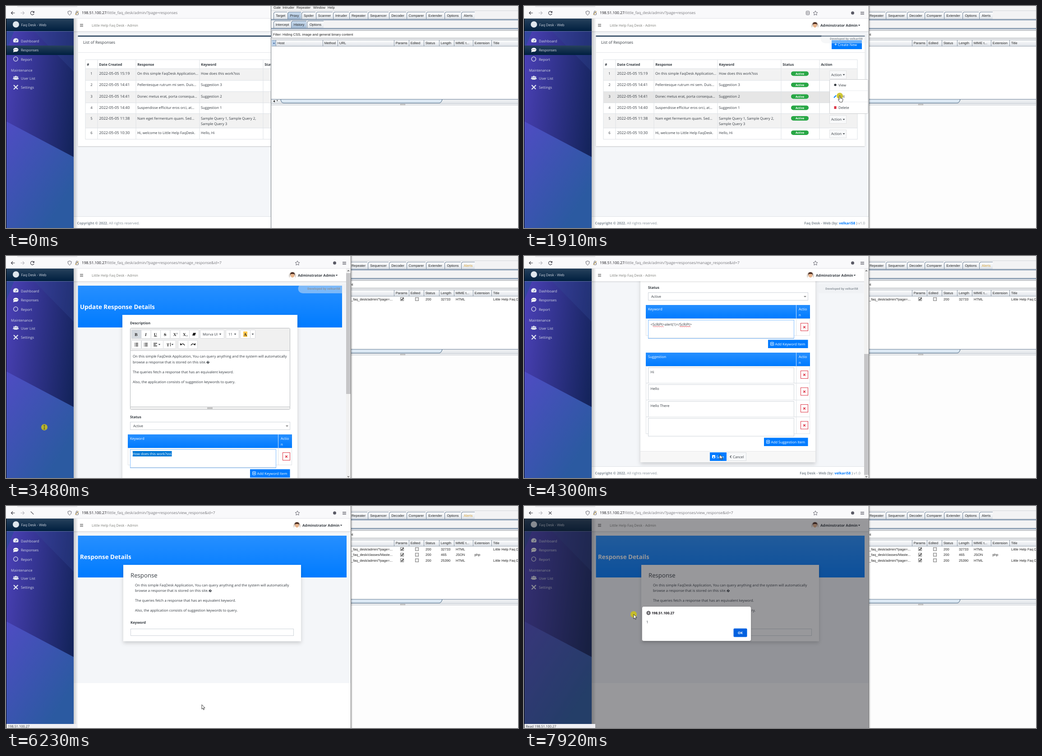
An HTML page that plays this animation: 1135 by 494 pixels, repeating every 7990 ms.

```html
<!DOCTYPE html>
<html lang="en">
<head>
<meta charset="utf-8">
<title>Admin panel recording</title>
<style>
html, body { margin: 0; width: 100%; height: 100%; overflow: hidden; background: #fff; }
svg { display: block; width: 1135px; height: 494px; }
text { font: 7.85px 'Open Sans', 'Noto Sans', sans-serif; fill: #343a40; text-rendering: geometricPrecision; white-space: pre; }
.b { font-weight: 700; }
.w { fill: #fff; }
.m { text-anchor: middle; }
.e { text-anchor: end; }
.side text { fill: #d3d8e4; }
.tool text { font: 7.6px 'Liberation Sans', Arial, sans-serif; fill: #222; }
.serif text { font: bold 9.5px 'Liberation Serif', serif; fill: #222; text-anchor: middle; }
.url { font-size: 8.42px; fill: #77777c; }
.title { font-size: 13.4px; font-weight: 700; fill: #fff; }
.foot { fill: #869099; }
.tag { font-size: 6.3px; font-weight: 700; fill: #8b939b; }
</style>
</head>
<body>
<svg id="stage" viewBox="0 0 1135 494"></svg>
<script>
const LOOP = 7990;
const HOST = '198.51.100.27', APP = 'little_faq_desk', BRAND = 'Faq Desk - Web', AUTHOR = 'velkari58';
const SITE = 'Little Help Faq Desk';

const T = (x, y, s, c = '', o = '') => `<text x="${x}" y="${y}" class="${c}" ${o}>${s}</text>`;
const R = (x, y, w, h, fill, o = '') => `<rect x="${x}" y="${y}" width="${w}" height="${h}" fill="${fill}" ${o}/>`;
const box = (x, y, w, h, fill, line, r = 0) => R(x + .5, y + .5, w - 1, h - 1, fill, `stroke="${line}" rx="${r}"`);
const P = (d, line, w = 1, o = '') => `<path d="${d}" fill="none" stroke="${line}" stroke-width="${w}" ${o}/>`;
const F = (d, fill) => `<path d="${d}" fill="${fill}"/>`;
const C = (x, y, r, fill, o = '') => `<circle cx="${x}" cy="${y}" r="${r}" fill="${fill}" ${o}/>`;
const G = (id, s, o = '') => `<g ${id && `id="${id}"`} ${o}>${s}</g>`;
const hline = (x1, x2, y, c) => R(x1, y, x2 - x1, 1, c);
const vline = (x, y1, y2, c) => R(x, y1, 1, y2 - y1, c);
const caret = (x, y, c = '#343a40') => F(`M${x - 2.3} ${y - 1.2}h4.6l-2.3 2.6z`, c);
const chevron = (x, y, up = 1) => P(`M${x - 2} ${y + up}l2 ${-2 * up}l2 ${2 * up}`, '#555', 1.1);
const grad = (id, a, b, dir = 'x2="0" y2="1"') =>
  `<linearGradient id="${id}" ${dir}><stop stop-color="${a}"/><stop offset="1" stop-color="${b}"/></linearGradient>`;
const shadow = (id, dy, blur, alpha) => `<filter id="${id}" x="-10%" y="-10%" width="120%" height="125%">
<feDropShadow dx="0" dy="${dy}" stdDeviation="${blur}" flood-opacity="${alpha}"/></filter>`;

const defs = `<defs>
${grad('navy', '#26415c', '#001f3f')}${grad('blue', '#268fff', '#007bff')}
${grad('tab', '#ffffff', '#dde2e8')}${grad('tabOn', '#c9dbee', '#a4bcd6')}
${grad('night', '#483fb2', '#14245c', 'x1="0" y1=".3" x2=".95" y2=".65"')}
${grad('dusk', '#4f4cc3', '#2b5aa1', 'x1="0" y1="0" x2=".8" y2=".8"')}
${grad('shade', 'rgba(0,0,0,.22)', 'rgba(0,0,0,0)')}
${grad('edge', 'rgba(0,0,0,.2)', 'rgba(0,0,0,0)', 'x2="1" y2="0"')}
${shadow('soft', .6, 1, .28)}${shadow('lift', 4, 4, .17)}
<clipPath id="toolClip"><rect id="toolRect" y="0" width="600" height="494"/></clipPath>
<clipPath id="selClip"><rect id="selRect" y="280" height="30"/></clipPath>
</defs>`;

function listPage() {
  const cols = [176, 203, 288, 429, 570, 655, 739];
  const tops = [119, 139, 165, 190, 215, 239, 271, 296];
  const data = [
    ['15:19', 'On this simple FaqDesk Application...', 'How does this work?sss'],
    ['14:41', 'Pellentesque rutrum mi sem. Duis...', 'Suggestion 3'],
    ['14:41', 'Donec metus erat, porta consequa...', 'Suggestion 2'],
    ['14:40', 'Suspendisse efficitur eros orci, at...', 'Suggestion 1'],
    ['11:38', 'Nam eget fermentum quam. Sed...', 'Sample Query 1, Sample Query 2,'],
    ['10:30', 'Hi, welcome to Little Help FaqDesk.', 'Hello, Hi']];
  let s = R(159.5, 66, 596, 246, '#fff', 'filter="url(#soft)"') + R(159.5, 66, 596, 2, '#001f3f') +
    T(171, 84, 'List of Responses', '', 'style="font-size:8.8px"') + hline(160, 756, 103, '#e3e5e8') +
    R(682, 76, 67, 20, '#007bff') + T(688, 89, '<tspan class="b" font-size="10">+</tspan> Create New', 'w');
  [0, 2, 4].forEach(i => s += R(176, tops[i + 1], 563, tops[i + 2] - tops[i + 1], '#f2f2f2'));
  s += R(176, 0, 563, 0, 'rgba(0,0,0,.05)', 'id="hover"');
  tops.forEach(y => s += hline(176, 739, y, '#dee2e6'));
  cols.forEach(x => s += vline(x - .5, 119, 297, '#dee2e6'));
  ['#', 'Date Created', 'Response', 'Keyword', 'Status', 'Action'].forEach((h, i) => s += T(cols[i] + 3.2, 132.5, h, 'b'));
  data.forEach(([time, text, key], i) => {
    const y = tops[i + 1] + 14 - (i > 3 ? .5 : 0) - (i == 1 ? 1 : 0);
    s += T(189.5, y, i + 1, 'm') + T(206.5, y, `2022-05-05 ${time}`, '', 'style="font-size:8.45px"') +
      T(291, y, text) + T(432, y, key) + R(592, y - 7.6, 39, 10, '#28a745', 'rx="5"') +
      T(611.5, y - .2, 'Active', 'b w m', 'style="font-size:6.2px"') +
      box(677, y - 9.5, 38, 19, '#f8f9fa', '#e2e3e5') + T(681, y + 2.8, 'Action') + caret(709, y);
  });
  s += T(432, 265, 'Sample Query 3');
  const menu = box(677, 163, 86, 77, '#fff', '#c8cacd', 2) + hline(678, 762, 188, '#e9ecef') + hline(678, 762, 213, '#e9ecef') +
    C(690, 175.5, 2.6, '#343a40') + T(697, 178.5, 'View') +
    P('M687 204l5-5', '#007bff', 2) + T(697, 203.5, 'Edit') + R(687.5, 223, 5, 6, '#dc3545') + T(697, 229, 'Delete');
  return s + G('menu', menu) + footer(756, 468);
}

function footer(right, y) {
  return R(150, y, 615, 30, '#fff') + hline(150, 765, y, '#dee2e6') +
    T(157.5, y + 17.5, '<tspan class="b">Copyright © 2022.</tspan> All rights reserved.', 'foot') +
    T(right, y + 17.5, `<tspan class="b">${BRAND} (by: <tspan fill="#007bff">${AUTHOR}</tspan> )</tspan> v1.0`, 'foot e');
}

const APP_LINE = 'On this simple FaqDesk Application, You can query anything and the system will';
const paragraphs = (x, y) => T(x, y, APP_LINE + ' automatically') +
  T(x, y + 12.5, 'browse a response that is stored on this site.\uFFFD') +
  T(x, y + 34.5, 'The queries fetch a response that has an equivalent keyword.') +
  T(x, y + 56.5, 'Also, the application consists of suggestion keywords to query.');

function editor() {
  const btn = (x, w, y, fill = '#fff') => box(x, y, w, 20, fill, '#d6d8db', 1);
  let s = box(275, 160, 355, 182, '#fff', '#b5b8bb', 2) + R(276, 161, 353, 49, '#f0f0f0') + hline(275, 630, 210, '#c4c6c9');
  let glyphs = '';
  ['B', 'I', 'U', 'S', 'X', 'X'].forEach((c, i) => {
    s += btn(278 + i * 21.4, 22.4, 164, i ? '#fff' : '#d5dadf');
    const deco = ['', 'font-style:italic', 'text-decoration:underline', 'text-decoration:line-through'][i] || '';
    glyphs += T(288.5 + i * 21.4, 177.5, c, '', `style="${deco}"`);
  });
  s += btn(406, 22, 164) + G('', glyphs, 'class="serif"') + T(378, 174, '2', 'b', 'style="font-size:4px"') +
    T(400, 179, '2', 'b', 'style="font-size:4px"') + F('M415 171h6l-2 6h-6z', '#222') +
    btn(430, 54, 164) + T(436, 177, 'Morva UI') + caret(475, 174) + btn(487, 30, 164) + T(493, 177, '11') + caret(508, 174) +
    btn(519, 23, 164) + R(526, 168, 9, 12, '#ffc94d') + G('', T(530.5, 177.5, 'A'), 'class="serif"') + btn(541, 12, 164) + caret(547, 174);
  [[278, 22], [300, 22], [321, 28], [348, 29], [381, 23], [403, 22]].forEach(([x, w]) => s += btn(x, w, 187));
  [0, 3, 6].forEach((d, i) => {
    s += R(287, 193.5 + d, 6, 1.4, '#222') + R(284.5, 193.5 + d, 1.2, 1.4, '#222') + R(308, 193.5 + d, 6, 1.4, '#222') +
      C(306.3, 194.2 + d, .8, '#222') + R(327, 193.5 + d, i == 1 ? 5 : 8, 1.4, '#222');
  });
  s += caret(340, 197) + G('', T(359, 200.5, 'T'), 'class="serif"') + P('M364.5 193v8', '#222') + caret(369, 197) +
    P('M388 197q5-4 8 2', '#222', 1.4) + F('M386 198.5v-5l4.5 4.5z', '#222') +
    P('M410 199q3-6 8-2', '#222', 1.4) + F('M420 198.5v-5l-4.5 4.5z', '#222');
  return s + paragraphs(281, 226) + R(276, 335, 353, 6, '#f0f0f0') + hline(275, 630, 335, '#c4c6c9') +
    hline(446, 458, 337, '#999') + hline(446, 458, 339, '#999');
}

const rawArea = () => box(275, 160, 355, 41, '#fff', '#ced4da') + T(280, 172.7, '&lt;p>' + APP_LINE) +
  T(280, 185, 'automatically browse a response that is stored on this site.\uFFFD&lt;/p>&lt;p>The queries fetch a') +
  T(280, 197.4, 'response that has an equivalent keyword.&lt;/p>&lt;p>Also, the application consists of') +
  R(619, 161, 10, 39, '#f3f3f3') + chevron(623.5, 166) + chevron(623.5, 185, -1) + P('M620 199l7-7M624 199l3-3', '#57a');

function formTable(y, name, rows) {
  let s = R(270, y, 364, 30, 'url(#blue)') + vline(603, y, y + 31, '#cfe4fb') +
    T(275, y + 12, name, 'w') + T(609, y + 12, 'Actio', 'w') + T(609, y + 24.5, 'n', 'w');
  rows.forEach((label, i) => {
    const top = y + 30 + i * 37.5;
    s += box(270, top, 364, 38.5, '#fff', '#dee2e6') + vline(603, top, top + 38, '#dee2e6') +
      box(275, top + 3, 324, 41, '#fff', '#ced4da') + T(280.5, top + 15.7, label) +
      box(613, top + 10, 17, 18, '#fff', '#dc3545') + P(`M619.2 ${top + 17}l4.6 4.6m0-4.6l-4.6 4.6`, '#dc3545', 1.5);
  });
  return s;
}

const addButton = (x, y, label) => R(x, y, 629.5 - x, 18.5, '#007bff') +
  box(x + 5, y + 5, 8, 8, 'none', '#fff', 1) + P(`M${x + 7} ${y + 9}h4m-2-2v4`, '#fff') + T(x + 15.5, y + 12, label, 'w');

const wave = x => P(`M${x} 304` + 'q1-1.6 2 0t2 0'.repeat(6), '#e0202f', .8);

function editPage() {
  const script = 'ScRiPt>';
  const lower = T(275, 220, 'Status', 'b') + box(275, 228, 355, 18, '#fff', '#ced4da') + T(282, 240, 'Active') + chevron(623, 237, -1) +
    formTable(256, 'Keyword', ['']) +
    G('focus', box(275, 289, 324, 42, 'none', '#80bdff')) +
    G('before', T(280.5, 302, 'How does this work?sss') +
      G('', R(280.5, 293, 87, 12, '#0078d7') + T(280.5, 302, 'How does this work?sss', 'w'), 'clip-path="url(#selClip)"')) +
    G('after', T(280.5, 302, `&lt;${script}alert(1)&lt;/${script}`) + wave(285.5) + wave(345)) +
    addButton(541, 333.5, 'Add Keyword Item') +
    formTable(362, 'Suggestion', ['Hi', 'Hello', 'Hello There', '']) + addButton(532, 551.5, 'Add Suggestion Item') +
    R(258, 581, 388, 25, '#f7f7f7') + hline(258, 646, 581, '#e6e7e8') + R(412, 584, 37, 19, '#007bff') +
    R(417, 590, 7, 7, '#fff', 'rx="1"') + R(419, 593.5, 3, 2.5, '#007bff') + T(426.5, 597, 'Save', 'w') +
    box(451, 584, 42, 19, '#f8f9fa', '#dde0e3') + P('M459.5 591l-2.5 2.8l2.5 2.8', '#343a40', 1.2) + T(463, 597, 'Cancel') +
    footer(746, 615);
  return R(159.5, 66, 585.5, 93, 'url(#blue)') + T(164, 118, 'Update Response Details', 'title') +
    R(258, 131, 388, 475, '#fff', 'id="card" filter="url(#lift)"') + T(275, 152, 'Description', 'b') +
    G('raw', rawArea()) + G('rich', editor()) + G('lower', lower);
}

const viewPage = () => R(150, 394, 615, 100, '#fff') + R(159.5, 66, 595.5, 93, 'url(#blue)') + T(164, 118, 'Response Details', 'title') +
  R(260, 131, 394, 170, '#fff', 'filter="url(#lift)"') + T(276, 159, 'Response', '', 'style="font-size:13.2px"') +
  paragraphs(286, 178.5) + T(276, 262, 'Keyword', 'b') + box(276, 273, 362, 16, '#fff', '#ced4da');

function sidebar() {
  const items = [[78, 'Dashboard'], [98.5, 'Responses'], [119, 'Report'], [161, 'User List'], [181.5, 'Settings']];
  return R(150, 28, 10, 466, 'url(#edge)') + R(1, 28, 149, 466, 'url(#night)') +
    F('M1 56h17L1 97z', '#34479f') + F('M150 56v90L62 56z', 'rgba(50,75,150,.3)') +
    F('M1 257L150 336V494H1z', 'url(#dusk)') + R(1, 28, 149, 28, 'url(#navy)') + hline(1, 150, 56, 'rgba(200,215,235,.35)') +
    R(1, 88, 149, 21, 'url(#navy)', 'id="active"') + C(22, 41, 7, '#dfe6ee') + T(33.5, 45, BRAND) +
    items.map(([y, s]) => T(33, y + 2.8, s)).join('') + T(11, 145.5, 'Maintenance') +
    G('', F('M17 81a6 6 0 1 1 9.6 0z', '#e4e8f2') + P('M21.5 79l3-4', '#34408e', 1.2) +
      `<ellipse cx="21.8" cy="97.3" rx="5.6" ry="4.4" fill="#fff"/>` + F('M17 99l-1 4l5-2z', '#fff') +
      [19, 21.8, 24.6].map(x => C(x, 97.3, .8, '#16304f')).join('') + C(21.5, 118, 4.8, 'none', 'stroke="#e4e8f2" stroke-width="1.2"') +
      [[18, 158, 1.6], [25.5, 158, 1.6], [21.8, 157.5, 2.2]].map(([x, y, r]) => C(x, y, r, '#e4e8f2') +
        F(`M${x - r * 1.7} ${y + r * 3}a${r * 1.7} ${r * 2} 0 0 1 ${r * 3.4} 0z`, '#e4e8f2')).join('') +
      P('M17 176l9 9M26.5 176l-9.5 9.5', '#e4e8f2', 2.2)) +
    R(0, 0, 1, 494, '#000');
}

const navbar = () => R(150, 28, 615, 28, '#fff') + R(150, 56, 615, 4, 'url(#shade)', 'opacity=".45"') +
  [40, 42.5, 45].map(y => hline(164, 171, y, '#555')).join('') + T(190, 45.7, `${SITE} - Admin`, '', 'style="fill:#7c7d78"') +
  G('user', C(645, 43.5, 8.3, '#dcd5cf') + F('M638.5 48.6a6.5 5 0 0 1 13 0a8.3 8.3 0 0 1-13 0z', '#fff') +
    `<ellipse cx="645" cy="43" rx="4.3" ry="5" fill="#e8b48c"/>` + F('M640 43q-1-7 5-7t5 7l-1.5-3h-7z', '#4a2d22') +
    T(657, 46.2, 'Adminstrator Admin', 'b', 'style="font-size:8.05px"') + caret(743, 43));

const chrome = () => R(0, 0, 765, 28, '#f9f9fb') + hline(25, 158, 1, '#d0d0d6') + hline(1, 765, 27, '#e1e1e6') +
  P('M19.5 15.5h-8m3.5-3.5l-3.5 3.5l3.5 3.5', '#3a3a44', 1.1) + P('M32.5 15.5h8m-3.5-3.5l3.5 3.5l-3.5 3.5', '#b6b6bd', 1.1) +
  G('reload', P('M61.5 13.5a3.9 3.9 0 1 0 .5 3.5', '#3a3a44', 1.1) + F('M62.8 11v4h-4z', '#3a3a44')) +
  G('stop', P('M-3.2-3.2l6.4 6.4', '#3a3a44', 1.1) + P('M3.2-3.2l-6.4 6.4', '#3a3a44', 1.1, 'id="stopArm"')) +
  P('M141 11l4 1.5q0 6-4 8q-4-2-4-8z', '#5b5b66') + box(154, 14.5, 7, 5.5, 'none', '#5b5b66', 1) + P('M155.5 15v-2a1.8 1.8 0 0 1 3.6 0v2', '#5b5b66') +
  P('M153.5 20l7.5-8.5', '#d9a520', 1) +
  T(168, 18.4, `<tspan fill="#15141a">${HOST}</tspan>/${APP}/admin/?page=responses<tspan id="route"></tspan>`, 'url') +
  G('reader', box(625, 11, 8, 9, 'none', '#5b5b66', 1) + P('M627 14.5h4M627 16.5h4', '#5b5b66', .8)) +
  P('M646 10.8l1.5 3.2l3.4.4l-2.5 2.4l.7 3.5l-3.1-1.8l-3.1 1.8l.7-3.5l-2.5-2.4l3.4-.4z', '#5b5b66', .9) +
  C(728.5, 15.5, 3.5, '#5b5b66') + [13, 15.5, 18].map(y => hline(746, 754, y, '#4a4a55')).join('');

function proxyTool() {
  let s = R(587, 0, 548, 494, '#fdfdfd') + R(587, 0, 548, 75, '#f3f3f4') + hline(587, 1135, 10, '#d5d8dc');
  [[593, 'Gale'], [613, 'Intruder'], [644, 'Repeater'], [681, 'Window'], [713, 'Help']].forEach(([x, w]) => s += T(x, 5.6, w));
  const tabs = (y, xs, names, on) => names.forEach((n, i) => {
    const x = xs[i], w = xs[i + 1] - x;
    s += F(`M${x} ${y + 16}v-13l3-3h${w - 4}v16z`, '#70859b') + F(`M${x + 1} ${y + 16}v-12.5l2.5-2.5h${w - 4.5}v15z`, `url(#${i == on ? 'tabOn' : 'tab'})`) +
      T(x + w / 2, y + 10.6, n, 'm', n == 'Alerts' ? 'id="alerts"' : '');
  });
  tabs(13, [593, 624, 655, 687, 725, 761, 802, 849, 888, 931, 972, 1009, 1040],
    ['Target', 'Proxy', 'Spider', 'Scanner', 'Intruder', 'Repeater', 'Sequencer', 'Decoder', 'Comparer', 'Extender', 'Options', 'Alerts'], 1);
  tabs(33, [593, 632, 667, 705], ['Intercept', 'History', 'Options'], 1);
  [29, 49].forEach(y => s += R(587, y, 548, 3, '#c8d6e6') + hline(587, 1135, y, '#5b7088') + hline(587, 1135, y + 2, '#7d92aa'));
  s += box(589, 54, 560, 18, '#fff', '#8f979f') + T(592, 65.6, 'Filter: Hiding CSS, image and general binary content') +
    R(589, 75, 546, 15, 'url(#tab)') + hline(589, 1135, 75, '#9aa5b1') + hline(589, 1135, 89, '#9aa5b1') +
    R(589, 76, 10, 13, '#b9cfe6') + F('M592 84l2-3l2 3z', '#355d9a') + R(589, 90, 546, 117, '#fff');
  [599, 703, 736, 861, 894, 927, 961, 994, 1036, 1077].forEach((x, i) => s += vline(x - 1, 75, 90, '#8d99a6') +
    T(x + 2.7, 84.7, ['Host', 'Method', 'URL', 'Params', 'Edited', 'Status', 'Length', 'MIME t...', 'Extension', 'Title'][i]));
  const check = (x, y, on) => box(x - 4, y - 4, 8, 8, on ? '#fff' : '#eee', '#777') + (on ? P(`M${x - 2} ${y}l1.7 2l3-4.5`, '#111', 1.3) : '');
  const row = (id, i, path, type, status, size, ext, title) => {
    const y = 98.6 + i * 12.5;
    return G(id, T(857, y, `/${APP}/${path}...`, 'e') + check(878, y - 2.7, 1) + check(911, y - 2.7, 0) +
      T(930, y, status) + T(964, y, size) + T(997, y, type) + T(1038.5, y, ext) + T(1080, y, title));
  };
  s += row('row1', 0, 'admin/?page=', 'HTML', 200, 32733, '', SITE) + row('row2', 1, 'classes/Maste', 'HTML', '', '', 'php', '') +
    row('row2done', 1, 'classes/Maste', 'JSON', 200, 465, 'php', '') + row('row3', 2, 'admin/?page=', 'HTML', 200, 25390, '', SITE);
  return s + R(587, 207, 548, 10, '#e9ecef') + hline(587, 1135, 207, '#6f8399') + hline(587, 1135, 216, '#b9c1ca') +
    F('M592 212l4-2.5v5z', '#333') + F('M600 209l2 4v-4z', '#333') +
    F('M609 208h358q-2 8-7 8H616q-6 0-7-8z', '#dbe8f3') + P('M609 208q1 8 7 8H960q5 0 7-8', '#44617f') +
    R(587, 217, 548, 4, '#eceef0') + hline(587, 1135, 220, '#c9cdd2') + box(874, 218, 11, 3, '#ddd', '#aaa') + vline(587, 0, 494, '#6d747c');
}

const scrollbar = () => R(754, 28, 10, 466, '#f1f1f1') + R(754, 38, 10, 269, '#c6c6c8', 'id="thumb"') + chevron(759, 33) + chevron(759, 491, -1);

const dialog = () => R(1, 28, 764, 466, 'rgba(28,27,34,.45)') +
  R(261.5, 223.5, 242, 77, '#fff', 'rx="4" stroke="#77777c" stroke-width=".6" filter="url(#soft)"') +
  C(276, 238, 4, 'none', 'stroke="#15141a"') + P('M272 238h8M276 234q-4 4 0 8q4-4 0-8', '#15141a', .8) +
  T(283, 240.9, HOST, 'b', 'style="font-size:7.65px;fill:#15141a"') + T(271, 261, '1') +
  R(464.5, 272.5, 30, 19, '#0061e0', 'rx="2"') + T(479.5, 284.8, 'OK', 'b w m', 'style="font-size:7.4px"');

const pointers = C(0, 0, 7, 'rgba(203,193,28,.88)', 'id="glow"') +
  G('arrow', `<path d="M0 0v10l2.3-2.1l1.6 3.7l1.6-.7l-1.6-3.6h3.2z" fill="#fff" stroke="#111" stroke-width=".8"/>`) +
  G('hand', `<path d="M-1.2 1a1.2 1.2 0 0 1 2.4 0v4l5 1.2q1 .4.8 1.6l-.8 4.2l-1 2h-5l-4-5.6q.4-1.6 2.6.4z" fill="#fff" stroke="#111" stroke-width=".8"/>`) +
  G('beam', P('M-1.8-4.5q1.8 0 1.8 1v7q0 1 1.8 1M1.8-4.5q-1.8 0-1.8 1m0 7q0 1-1.8 1', '#222', .8));

document.getElementById('stage').innerHTML = defs + R(0, 0, 1135, 494, '#f4f6f9') +
  G('list', listPage()) + G('edit', editPage()) + G('view', viewPage()) + G('nav', navbar()) +
  G('side', sidebar(), 'class="side"') +
  G('loader', R(1, 28, 753, 466, 'rgba(74,74,74,.23)') + P('M-12.4-13.7A18.5 18.5 0 0 1 9.2 16', '#1486f5', 3, 'id="spinner"')) +
  G('tag', F('M763 62H668a10 10 0 0 0 0 21H763z', 'rgba(236,237,239,.45)') + T(678, 75.3, `Developed by ${AUTHOR}`, 'tag')) +
  G('scroll', scrollbar()) + G('dialog', dialog()) + chrome() +
  G('status', R(1, 485, 157, 9, '#f0f0f4') + T(4, 492.6, `<tspan id="verb"></tspan>${HOST}`, '', 'style="font-size:7.4px"')) +
  vline(764, 0, 494, '#777') + G('tool', proxyTool(), 'class="tool" clip-path="url(#toolClip)"') +
  R(765, 0, 4, 494, 'url(#edge)', 'id="frontEdge"') + G('cursor', pointers);

const el = {};
document.querySelectorAll('[id]').forEach(n => el[n.id] = n);
const show = (id, on) => el[id].style.display = on ? '' : 'none';
const move = (id, x, y, more = '') => el[id].setAttribute('transform', `translate(${x} ${y}) ${more}`);
const set = (id, attrs) => { for (const k in attrs) el[id].setAttribute(k, attrs[k]); };
const within = (t, ...spans) => spans.some(([a, b]) => t >= a && t < b);
const smooth = p => { p = Math.min(1, Math.max(0, p)); return p * p * (3 - 2 * p); };

const path = [[70, 922, 260], [400, 560, 200], [500, 550, 195], [820, 640, 182], [1160, 693, 169], [1420, 684, 157],
  [1710, 684, 157], [1910, 700, 200], [2050, 700, 200], [2260, 482, 201], [2800, 440, 366], [2870, 440, 366],
  [3120, 368, 440], [3200, 368, 440], [3470, 85, 381], [3500, 85, 381], [3610, 118, 400], [4300, 434, 442], [7170, 434, 442], [7880, 243, 241]];

function cursorAt(t) {
  const i = path.findIndex(k => k[0] > t);
  if (i < 1) return (i ? path[path.length - 1] : path[0]).slice(1);
  const [a, b] = [path[i - 1], path[i]], p = smooth((t - a[0]) / (b[0] - a[0]));
  return [a[1] + (b[1] - a[1]) * p, a[2] + (b[2] - a[2]) * p];
}

function render(t) {
  const front = t >= 480, page = t < 2120 ? 'list' : t < 6150 ? 'edit' : 'view';
  const rich = t >= 2420, pasted = t >= 3700, grow = rich ? 141 : 0;
  const [x, y] = cursorAt(t);

  ['list', 'edit', 'view'].forEach(p => show(p, p == page));
  show('active', page == 'list');
  show('reader', page == 'list');
  el.route.textContent = { list: '', edit: '/manage_response&id=7', view: '/view_response&id=7' }[page];

  set('toolRect', { x: front ? 765 : 587 });
  show('frontEdge', front);
  show('row1', t >= 2190);
  show('row2', within(t, [4580, 6090]));
  show('row2done', t >= 6090);
  show('row3', t >= 6230);
  el.alerts.style.fill = within(t, [2600, 6540]) ? '#d3a13a' : '';

  const rows = [139, 165, 190, 215, 239, 271, 296];
  const r = rows.findIndex((top, i) => y >= top && y < rows[i + 1]);
  show('hover', t >= 70 && r >= 0 && x > 176 && x < 739);
  if (r >= 0) set('hover', { y: rows[r], height: rows[r + 1] - rows[r] });
  show('menu', t >= 1550);

  const scroll = 288 * smooth((t - 3800) / 380);
  move('edit', 0, -scroll);
  move('lower', 0, grow);
  set('card', { height: 475 + grow });
  show('raw', !rich);
  show('rich', rich);
  show('focus', within(t, [3150, 4440]));
  show('before', !pasted);
  show('after', pasted);
  const left = Math.min(368, Math.max(280.5, x));
  set('selRect', { x: left, width: t >= 3200 ? 368 - left : 0 });
  show('scroll', page == 'edit');
  set('thumb', { y: 38 + scroll * 180 / 288, height: rich ? 269 : 335 });

  move('user', page == 'edit' ? -10 : 0, 0);
  move('tag', page == 'edit' ? -10 : 0, 0);
  show('tag', page == 'list' || within(t, [2680, 6150]));
  show('loader', within(t, [4510, 6150]));
  move('spinner', 381, 265, `rotate(${(t - 5130) * .36})`);
  show('dialog', t >= 6290);

  const loading = within(t, [2050, 2420], [6090, LOOP]);
  show('reload', !loading);
  show('stop', loading);
  show('stopArm', t >= 6430);
  move('stop', page == 'view' ? 58 : 57, page == 'view' ? 15.5 : 13.5, `scale(${page == 'view' ? 1 : .45})`);
  show('status', loading);
  el.verb.textContent = t >= 6500 ? 'Read ' : '';

  show('cursor', t >= 70);
  move('cursor', x, y);
  const kind = within(t, [1000, 2190]) ? 'hand' : within(t, [2190, 3620]) ? 'beam' : 'arrow';
  ['arrow', 'hand', 'beam'].forEach(k => show(k, k == kind));
  show('glow', within(t, [420, 520], [1500, 1720], [1900, 2060], [3120, 3540], [4430, 4580], [7880, LOOP]));
}

function tick() {
  render(performance.now() % LOOP);
  requestAnimationFrame(tick);
}
tick();
</script>
</body>
</html>
```
